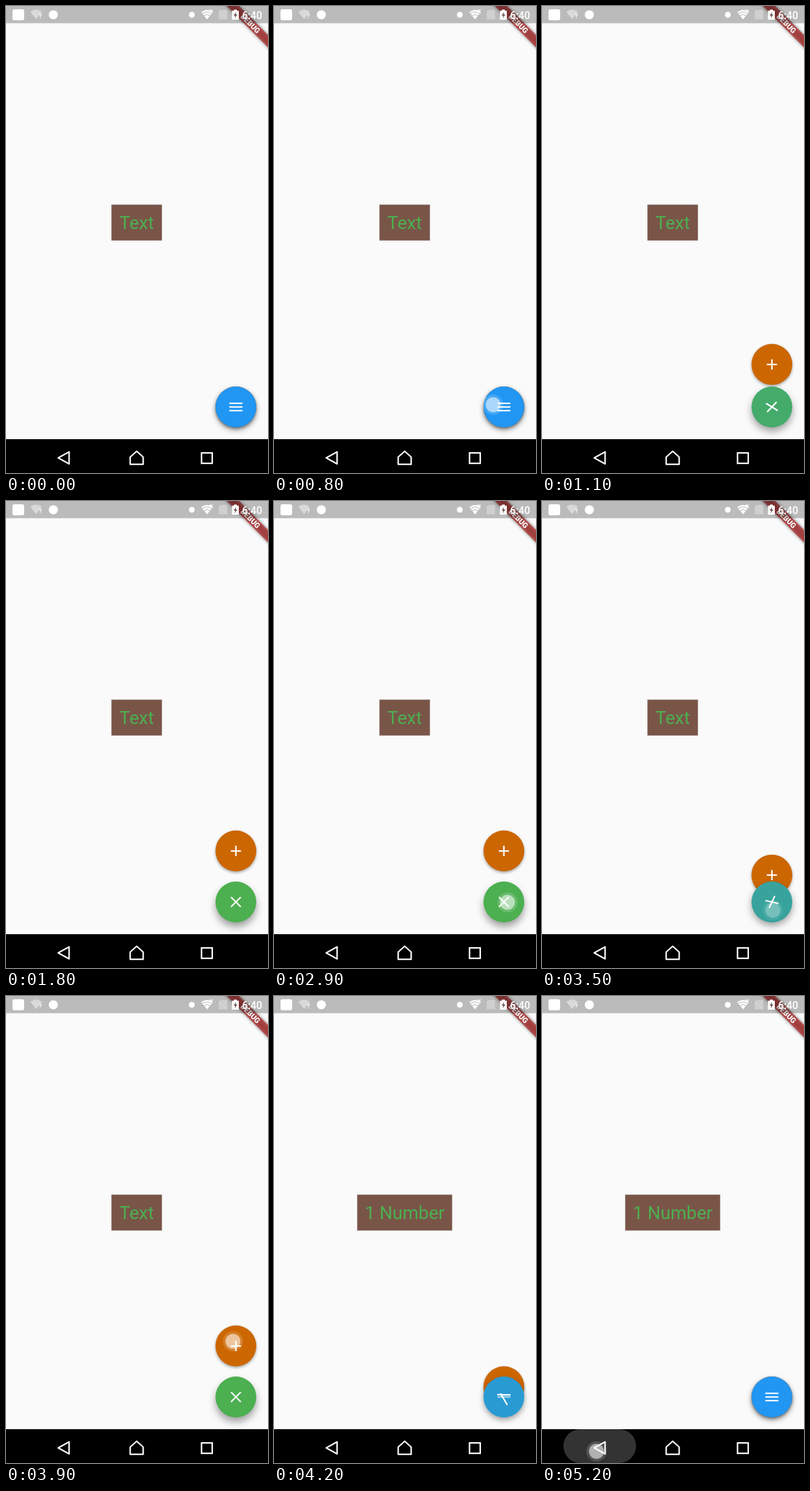
An HTML page for the animation above (5300 ms loop, 404 by 718 pixels).

```html
<!DOCTYPE html>
<html lang="en">
<head>
<meta charset="utf-8">
<title>Expanding action button</title>
<style>
  html, body { margin: 0; width: 100%; height: 100%; overflow: hidden; background: #fafafa; }
  svg { display: block; width: 404px; height: 718px; }
  text { font-family: Roboto, Arial, sans-serif; text-anchor: middle; }
  .line { fill: none; stroke: #fff; stroke-width: 2.25; }
</style>
</head>
<body>
<svg viewBox="0 0 404 718">
  <defs>
    <path id="fan" d="M0 14.5 L-9 3.5 Q0 -3.5 9 3.5 Z"/>
    <clipPath id="stage"><rect width="404" height="718"/></clipPath>
  </defs>
  <g clip-path="url(#stage)">
    <rect width="404" height="718" fill="#fafafa"/>

    <rect id="box" y="305.5" height="55" fill="#795548" stroke="#a89a94" stroke-width=".6"/>
    <text id="label" x="201.5" y="343" font-size="28.1" fill="#4caf50"></text>

    <g id="add">
      <circle r="31.5" fill="#cc6600" style="filter:drop-shadow(0 2px 2px rgba(0,0,0,.35))"/>
      <path class="line" d="M-7.9 0H7.9M0 -7.9V7.9"/>
    </g>
    <g transform="translate(354.5 616.5)">
      <circle id="fab" r="31.5"/>
      <path id="barTop" class="line"/>
      <path id="barMid" class="line" d="M-10.1 0H10.1"/>
      <path id="barLow" class="line"/>
    </g>

    <!-- corner ribbon -->
    <g transform="translate(404 0) rotate(45)">
      <rect x="-64" y="31.5" width="128" height="13.5" fill="#000" opacity=".5" style="filter:blur(2.6px)"/>
      <rect x="-64" y="31.5" width="128" height="13.5" fill="#b71c1c" opacity=".63"/>
      <text y="42.3" font-size="11.5" font-weight="900" fill="#fff">DEBUG</text>
    </g>

    <!-- status bar -->
    <rect width="404" height="26.5" opacity=".255"/>
    <g fill="#fff">
      <rect x="10" y="5" width="18" height="17" rx="3"/>
      <g opacity=".45">
        <use href="#fan" x="46.5" y="5.5"/>
      </g>
      <text x="53" y="19" font-size="9" font-weight="700">?</text>
      <circle cx="73" cy="13.5" r="7"/>
      <circle cx="286.5" cy="13.5" r="4.5"/>
      <use href="#fan" x="310" y="6"/>
      <path d="M328 8.500L332 6H341V20.500H328Z" opacity=".3"/>
      <path d="M351.500 5.500H356V7.300H359V21H348.500V7.300H351.500Z"/>
      <text x="379.500" y="19.500" font-size="15.75" font-weight="500">6:40</text>
    </g>
    <path d="M303 11.500Q310 7 317 11.500M305.500 15Q310 11.500 314.500 15" fill="none" stroke="#bababa" stroke-width="1.200"/>
    <path d="M314 5.500L318.500 10M318.500 5.500L314 10" fill="none" stroke="#fff" stroke-width="1.500"/>
    <path d="M354.800 9L351 14.700H353.500L352.700 19L356.700 13H354.200Z" fill="#6d5050"/>
    <path d="M329 8L341 21" stroke="#ddd" stroke-width="1" opacity=".6"/>

    <!-- navigation bar -->
    <rect y="666" width="404" height="52"/>
    <rect id="ripple" y="666" height="52" rx="26" fill="#333"/>
    <g class="line" stroke-linejoin="round">
      <path d="M80.500 694.700L97.300 685.500V704Z"/>
      <path d="M201.500 684.500L191.500 693.500V704.700H211.500V693.500Z"/>
      <path d="M301.500 687H318V703H301.500Z" stroke-linejoin="miter"/>
    </g>

    <g id="touch" fill="#fff">
      <circle r="15.5" opacity=".16"/>
      <circle r="11.5" opacity=".55"/>
    </g>
  </g>
</svg>
<script>
const LOOP = 5300, STEP = 100;
const el = id => document.getElementById(id);
const clamp = v => Math.max(0, Math.min(1, v));
const ramp = (t, start, length) => clamp((t - start) / length);
const mix = (a, b, p) => a + (b - a) * p;
const set = (id, attrs) => {
  for (const name in attrs) el(id).setAttribute(name, attrs[name]);
};

const BLUE = [33, 150, 243], GREEN = [76, 175, 80];
const TAPS = [
  { from: 700, to: 850, x: 338, y: 613 },
  { from: 2800, to: 2950, x: 360, y: 617 },
  { from: 3300, to: 3450, x: 356, y: 629 },
  { from: 3800, to: 3960, x: 350, y: 531 },
  { from: 5100, to: 5300, x: 84, y: 700 }
];

// 0 = menu closed, 1 = open
const openness = t =>
  ramp(t, 850, 300) - ramp(t, 2950, 300) + ramp(t, 3342, 300) - ramp(t, 3960, 300);

function drawBar(id, angle, offset, half) {
  set(id, { d: `M${-half} 0H${half}`, transform: `translate(0 ${offset}) rotate(${angle})` });
}

function drawButtons(p) {
  const color = BLUE.map((c, i) => Math.round(mix(c, GREEN[i], p)));
  set('fab', {
    fill: `rgb(${color})`,
    style: `filter:drop-shadow(0 ${mix(4, 7, p)}px ${mix(4, 6, p)}px rgba(0,0,0,.36))`
  });
  set('add', { transform: `translate(354.5 ${mix(616.5, 538, p)})` });

  const spread = 5.6 * clamp(1 - 2 * p);
  const half = mix(10.1, 10.6, p);
  drawBar('barTop', 45 * p * p, -spread, half);
  drawBar('barLow', 135 * (1 - (1 - p) ** 2.6), spread, half);
  set('barMid', { opacity: clamp(1 - 2 * p) });
}

function drawLabel(t) {
  const counted = t >= 4000;
  const width = counted ? 146.5 : 77.5;
  el('label').textContent = counted ? '1 Number' : 'Text';
  set('box', { x: 201.5 - width / 2, width });
}

function drawTouch(t) {
  const tap = TAPS.find(k => t >= k.from && t < k.to + 100);
  set('touch', { opacity: tap ? (t < tap.to ? 1 : 0.5) : 0 });
  if (tap) set('touch', { transform: `translate(${tap.x} ${tap.y})` });

  const width = 112 * ramp(t, 5030, 140);
  set('ripple', { x: 89 - width / 2, width, opacity: width ? 1 : 0 });
}

function render(time) {
  const t = Math.floor((time % LOOP) / STEP) * STEP;
  drawButtons(openness(t));
  drawLabel(t);
  drawTouch(t);
}

const start = performance.now();
function tick() {
  render(performance.now() - start);
  requestAnimationFrame(tick);
}
tick();
</script>
</body>
</html>
```
